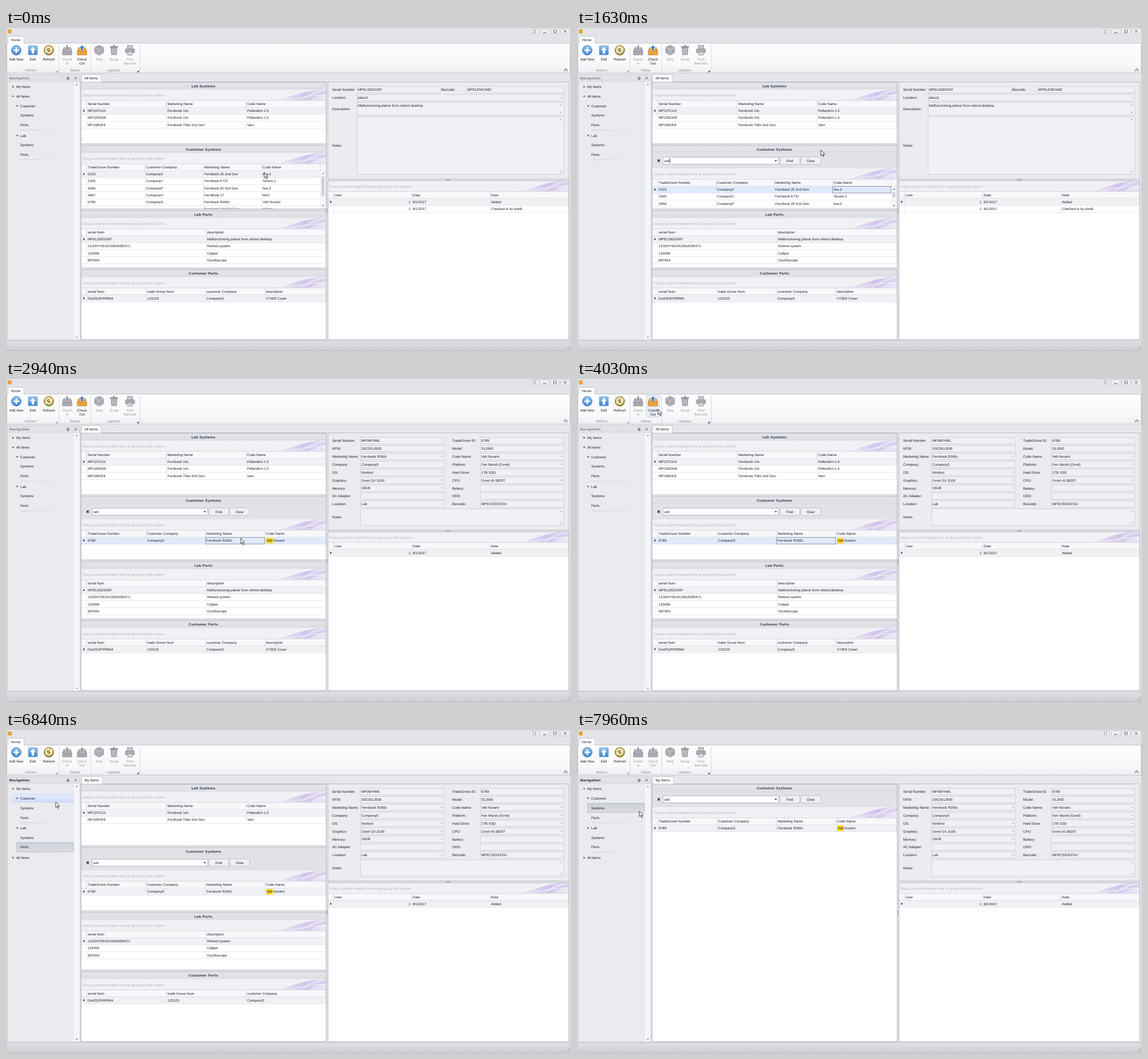
An HTML page for the animation above (8000 ms loop, 989 by 566 pixels).

```html
<!DOCTYPE html>
<html lang="en">
<head>
<meta charset="utf-8">
<title>Inventory</title>
<style>
html, body { margin: 0; width: 100%; height: 100%; overflow: hidden; background: #e6e7ec; }
#stage { display: block; width: 100vw; height: 100vh; }
text { font: 6.1px "Liberation Sans", Arial, sans-serif; fill: #1c1e28; text-rendering: geometricPrecision; white-space: pre; }
.bold { font: bold 5.9px "DejaVu Sans", sans-serif; fill: #464a55; }
.hint { font-size: 6.28px; fill: #b4b6be; }
.dim { fill: #85888f; }
.off { fill: #9a9ca3; }
.mid { text-anchor: middle; }
.end { text-anchor: end; }
</style>
</head>
<body>
<svg id="stage" viewBox="0 0 989 566">
  <defs>
    <linearGradient id="ribbon" x2="0" y2="1"><stop stop-color="#fdfdfe"/><stop offset=".7" stop-color="#f8f8fa"/><stop offset="1" stop-color="#eeeff2"/></linearGradient>
    <linearGradient id="status" x2="0" y2="1"><stop stop-color="#dfe0e5"/><stop offset="1" stop-color="#cdcfd5"/></linearGradient>
    <linearGradient id="caption" x2="0" y2="1"><stop stop-color="#e5e6eb"/><stop offset="1" stop-color="#dcdee4"/></linearGradient>
    <linearGradient id="hover" x2="0" y2="1"><stop stop-color="#e4ecfd"/><stop offset="1" stop-color="#cfdcfa"/></linearGradient>
    <linearGradient id="picked" x2="0" y2="1"><stop stop-color="#cdd0d7"/><stop offset="1" stop-color="#dadce2"/></linearGradient>
    <linearGradient id="blue" x2="0" y2="1"><stop stop-color="#8fc3f2"/><stop offset="1" stop-color="#3b83cc"/></linearGradient>
    <linearGradient id="gold" x2="0" y2="1"><stop stop-color="#cdb95a"/><stop offset="1" stop-color="#94812a"/></linearGradient>
    <linearGradient id="fade"><stop stop-color="#c3c5cc"/><stop offset="1" stop-color="#c3c5cc" stop-opacity="0"/></linearGradient>
    <linearGradient id="lilac"><stop stop-color="#d9cdf0" stop-opacity="0"/><stop offset=".6" stop-color="#cdbfea"/><stop offset="1" stop-color="#e4dcf4"/></linearGradient>
    <g id="swoosh">
      <path d="M0 19C35 13 62 2 100 0V19Z" fill="url(#lilac)" opacity=".45"/>
      <path d="M22 19C42 9 62 2 84 0H94C76 5 60 12 52 19Z" fill="url(#lilac)" opacity=".85"/>
      <path d="M58 19C72 10 86 4 100 2V7C88 10 77 14 71 19Z" fill="#cbbdea" opacity=".55"/>
      <path d="M10 18C40 10 60 4 82 0M34 19C56 13 78 9 100 10" fill="none" stroke="#fff" stroke-width=".9" opacity=".8"/>
    </g>
  </defs>
  <g id="view"></g>
  <path id="cursor" d="M0 0V9.6L2.2 7.6L3.9 11.4L5.4 10.7L3.8 7.1H6.8Z" fill="#fff" stroke="#15161c" stroke-width=".8"/>
</svg>
<script>
const LOOP = 8000;
const view = document.getElementById('view');
const cursor = document.getElementById('cursor');

// start, end, number of steps, way points
const moves = [
  [80, 630, 8, [452, 253], [449, 254], [446, 250], [432, 224]],
  [780, 780, 1, [432, 224], [427, 214]],
  [2100, 2480, 6, [427, 214], [424, 240], [411, 279]],
  [3250, 4030, 11, [411, 279], [270, 165], [150, 72], [112, 58], [142, 53]],
  [4100, 4410, 5, [142, 53], [190, 60], [223, 65], [200, 60], [160, 52], [128, 47]],
  [5190, 5650, 7, [128, 47], [118, 66], [92, 95]],
  [6430, 6840, 6, [92, 95], [90, 112], [87, 126]],
  [6910, 7150, 4, [87, 126], [84, 134]],
  [7790, 7960, 3, [84, 134], [109, 142]]
];

function pointer(t) {
  const m = moves.filter(m => m[0] <= t).pop();
  if (!m) return moves[0][3];
  const [a, b, n, ...pts] = m;
  const step = a === b ? 0 : Math.floor((t - a) / (b - a) * (n - 1) + 1e-6);
  const p = Math.min(1, (step + 1) / n) * (pts.length - 1);
  const i = Math.min(pts.length - 2, Math.floor(p));
  return [0, 1].map(k => pts[i][k] + (pts[i + 1][k] - pts[i][k]) * (p - i));
}

const txt = (x, y, s, cls = '') => `<text x="${x}" y="${y + 2.1}" class="${cls}">${s}</text>`;
const path = (d, fill, stroke = 'none', w = 1) => `<path d="${d}" fill="${fill}" stroke="${stroke}" stroke-width="${w}"/>`;
const rect = (x, y, w, h, fill, stroke, r = 0) => stroke
  ? `<rect x="${x + .5}" y="${y + .5}" width="${w - 1}" height="${h - 1}" rx="${r}" fill="${fill}" stroke="${stroke}" stroke-width=".8"/>`
  : `<rect x="${x}" y="${y}" width="${w}" height="${h}" rx="${r}" fill="${fill}"/>`;
const line = (x1, y1, x2, y2, c) => path(`M${x1} ${y1}L${x2} ${y2}`, 'none', c, .8);
const right = (x, y, c = '#22242c') => path(`M${x - 1} ${y - 2.2}L${x + 1.6} ${y}L${x - 1} ${y + 2.2}Z`, c);
const down = (x, y, c = '#4a4d57') => path(`M${x - 2} ${y - 1}H${x + 2}L${x} ${y + 1.4}Z`, c);
const up = (x, y, c = '#8b8e97') => path(`M${x - 2} ${y + 1}H${x + 2}L${x} ${y - 1.4}Z`, c);
const at = (x, y, s) => `<g transform="translate(${x} ${y})">${s}</g>`;
const clip = (x, y, w, h, s) => `<svg x="${x}" y="${y}" width="${w}" height="${h}" viewBox="${x} ${y} ${w} ${h}">${s}</svg>`;

function tray(body, edge, arrow, isIn) {
  return path('M-8 1L-6 -5H6L8 1V8H-8Z', body, edge, .7)
    + path('M-8 1H-3.5L-2 3.5H2L3.5 1H8V8H-8Z', body, edge, .7)
    + path(isIn ? 'M0 1L-4 -4H-1.8V-9H1.8V-4H4Z' : 'M0 -9L-4.6 -4H-1.9V1H1.9V-4H4.6Z', arrow, '#fff', .5);
}

function ribbon(s) {
  const grey = '#a9abb1', edge = '#8f9197';
  const buttons = [
    [18, 'Add New', '', 1, `<circle r="8.5" fill="url(#blue)" stroke="#2f6fb3" stroke-width=".7"/>` + path('M-5 0H5M0 -5V5', 'none', '#fff', 2.6)],
    [47, 'Edit', '', 1, rect(-8.5, -8.5, 17, 17, 'url(#blue)', '#7fa6cf', 1) + path('M0 -6L-5 0H-2V6H2V0H5Z', '#fff')],
    [75, 'Refresh', '', 1, `<circle r="8.6" fill="url(#gold)" stroke="#83742c" stroke-width=".7"/>` + path('M-4.5 2A4.7 4.7 0 0 1 3.2 -3.4M4.5 -1A4.7 4.7 0 0 1 -3 3.6', 'none', '#fff', 2) + path('M5.8 -5V.2L1 -1ZM-5.8 5V0L-1 1.2Z', '#fff')],
    [107, 'Check', 'In', 0, tray(grey, edge, '#97999f', true)],
    [133, 'Check', 'Out', !s.out, s.out ? tray(grey, edge, '#97999f') : tray('#f0a63c', '#b9772a', '#3f7fc4')],
    [163, 'Ship', '', 0, path('M0 -9L8 -5V4L0 9L-8 4V-5Z', grey, edge, .6) + path('M-8 -5L0 -1L8 -5M0 -1V9', 'none', '#d2d3d7', .9)],
    [189, 'Scrap', '', 0, path('M-5.5 -5H5.5L4.5 8H-4.5Z', grey, edge, .6) + path('M-7 -6H7M-2 -8.3H2', 'none', edge, 1.8) + path('M-2.5 -3V6M0 -3V6M2.5 -3V6', 'none', '#d8d9dc', .8)],
    [217, 'Print', 'Barcode', 0, rect(-5, -9, 10, 8, '#c3c5ca', edge) + rect(-8.5, -3, 17, 8, grey, edge, 1) + rect(-4.5, 2, 9, 7, '#d4d5d9', edge)]
  ];
  let o = rect(0, 0, 989, 27, '#e3e4e9') + rect(1, 26, 987, 53.5, 'url(#ribbon)', '#b9bbc3')
    + rect(3, 14, 29, 14, '#fcfcfd') + path('M3.5 27V15.5Q3.5 14.5 4.5 14.5H30.5Q31.5 14.5 31.5 15.5V27', 'none', '#b9bbc3', .8)
    + txt(17, 21, 'Home', 'mid') + rect(3, 2.5, 7, 7, '#e3a443');
  if (s.hot) o += rect(121, 28, 24.5, 39, '#e9effb', '#c0cbe4', 1);
  for (const [x, a, b, on, icon] of buttons) {
    const cls = on ? 'mid' : 'mid off';
    o += at(x, 39, icon) + txt(x, 54.5, a, cls) + txt(x, 62, b, cls);
  }
  for (const [x, name] of [[43, 'Actions'], [120.5, 'Status'], [188, 'Logistics']]) o += txt(x, 74, name, 'mid dim');
  for (const x of [93, 148.5, 235]) o += line(x, 29, x, 78, '#d0d2d8');
  for (const x of [89, 231]) o += path(`M${x + 1.5} 74V77.5H${x - 2}Z`, x < 100 ? '#8b8e97' : '#33353d');
  o += path('M976.5 74L979.7 71L983 74M976.5 76L979.7 73L983 76', 'none', '#5a5d66', .9);
  for (const x of [917, 935, 953, 971]) o += rect(x, 1, 16, 10, '#eeeff3', '#c6c8cf', 1);
  return o + path('M922 4H924M926 4H928M922 8H924M926 8H928M924.5 6H925.8M940 8H946M976.5 3.8L981 8.2M981 3.8L976.5 8.2', 'none', '#50535c', 1)
    + rect(958, 3.5, 6, 5, 'none', '#50535c');
}

function navItems(mine) {
  const kids = y => [
    ['Customer', y, 1, true], ['Systems', y + 16.8, 2], ['Parts', y + 33.6, 2],
    ['Lab', y + 52, 1, true], ['Systems', y + 68.8, 2], ['Parts', y + 85.3, 2]
  ];
  return mine
    ? [['My Items', 103, 0, true], ...kids(119.8), ['All Items', 223.8, 0, false]]
    : [['My Items', 103, 0, false], ['All Items', 119.8, 0, true], ...kids(136.5)];
}

function nav(s) {
  let o = rect(2, 82, 128, 465, '#eaebef', '#c3c5cc') + rect(3, 83, 126, 11.5, 'url(#caption)')
    + rect(119, 95, 10, 451, '#f5f5f8') + up(124, 99) + down(124, 542, '#8b8e97')
    + `<text x="5.5" y="90.4" class="bold" style="fill:${s.nav ? '#30333c' : '#898c95'}">Navigation</text>`
    + path('M107.2 86H110.2V89H107.2ZM106.4 89H111M108.7 89V91.5M119.8 86L123.8 90M123.8 86L119.8 90', 'none', '#5a5d66', .9);
  navItems(s.mine).forEach(([name, y, level, open], i) => {
    const left = [3, 11, 18][level], x = [18, 25, 25][level];
    if (i === s.sel) o += rect(left, y - 8.5, 100.5 + 18 - left, 17, 'url(#picked)', '#b6b9c2');
    else if (i === s.over) o += rect(left, y - 8, 118.5 - left, 15.5, 'url(#hover)', '#cbd6ef');
    if (level < 2) o += open ? down(x - 5.5, y) : right(x - 5.5, y, '#4a4d57');
    o += txt(x, y, name);
    if (name === 'Parts') o += rect(25, y + 8.7, 85, .8, 'url(#fade)');
  });
  return o;
}

function grid(x, w, y, bottom, cols, heads, rows, opt = {}) {
  const end = x + w, stop = opt.bar ? 550 : end, h0 = y + 19, r0 = y + 31.2, pitch = 12.2;
  let o = rect(x, y, w, bottom - y, '#fff') + rect(x, y, w, 19, '#f0f1f4')
    + `<use href="#swoosh" x="${end - 100}" y="${y}"/>` + txt(x + 2.5, y + 10, 'Drag a column header here to group by that column', 'hint')
    + rect(x, h0, w, 12, '#f8f8fa') + line(x, h0, end, h0, '#cfd1d8') + line(x, r0, end, r0, '#cfd1d8');
  rows.forEach((row, i) => {
    const top = r0 + i * pitch, mid = top + 5.8;
    if (!i) o += rect(x, top + .4, stop - x, pitch - .4, opt.blue ? '#e1eafc' : '#f0f1f4') + right(x + 4.5, mid);
    o += line(x, top + pitch, stop, top + pitch, '#e0e2e7');
    row.forEach((cell, c) => {
      if (opt.numeric && !c) o += txt(cols[1] - 2, mid, cell, 'end');
      else if (opt.mark && c === 3) {
        const [a, b] = cell.split(' ');
        o += rect(cols[c] + 2.5, top + 1.2, 11.5, 9.8, '#ffd51c') + txt(cols[c] + 3, mid, a) + txt(cols[c] + 15, mid, b);
      } else o += txt(cols[c] + 2, mid, cell);
    });
  });
  cols.concat(stop).forEach((c, i) => {
    o += line(c, h0, c, r0, '#cfd1d8');
    o += line(c, r0, c, r0 + rows.length * pitch, '#e0e2e7');
    if (i < heads.length) o += txt(c + 2, h0 + 6, heads[i]);
  });
  if (opt.focus >= 0) {
    const a = cols[opt.focus], b = cols[opt.focus + 1] || stop;
    o += rect(a, r0, b - a, 12.4, 'none', '#7d8798');
  }
  if (opt.bar) {
    o += rect(550, r0, end - 550, bottom - r0, '#f4f4f7') + up(555, r0 + 5, '#777a83') + down(555, bottom - 5.5, '#777a83')
      + rect(552.5, r0 + 10.5, 4.5, opt.bar, '#d3d5db', '#b5b8c0', 1);
  }
  return clip(x, y, w, bottom - y, o);
}

function panel(title, top, bottom, cols, heads, rows, opt = {}) {
  let o = rect(132, top, 428, 13.2, 'url(#caption)') + txt(345.5, top + 6.4, title, 'bold mid');
  if (opt.find) {
    const y = top + 26.5;
    o += rect(132, top + 13, 428, 27.2, '#e0e2e7') + path(`M141 ${y - 2}L145 ${y + 2}M145 ${y - 2}L141 ${y + 2}`, 'none', '#22242c', 1.4)
      + rect(150, y - 6.5, 203.5, 13, '#fff', '#a9acb5') + down(348, y, '#22242c');
    for (const [x, s] of [[355, 'Find'], [391.5, 'Clear']]) o += rect(x, y - 7, 35.5, 14, '#eff0f3', '#b3b6be', 1) + txt(x + 17.5, y, s, 'mid');
    o += opt.query === null ? txt(153, y, 'Enter text to search...', 'off') : txt(152.5, y, opt.query);
    if (opt.caret) {
      const x = 153 + [0, 3, 6.2, 7.7, 9.6][(opt.query || '').length];
      o += line(x, y - 4, x, y + 4, '#111');
    }
  }
  return o + grid(132, 428, top + 13 + (opt.find ? 27 : 0), bottom, cols, heads, rows, opt)
    + line(132, top, 560, top, '#a9acb5') + line(132, bottom, 560, bottom, '#a9acb5');
}

const thirds = [141, 280.5, 420], quarters = [141, 245, 349, 453];
const labSystems = [
  ['MP137CLN', 'Fernbook 14c', 'Pellandrin-1.5'],
  ['MP126GNK', 'Fernbook 14c', 'Pellandrin-1.5'],
  ['MP108VE8', 'Fernbook Tilde 2nd Gen', 'Varn']
];
const clientSystems = [
  ['0123', 'CompanyX', 'Fernbook 20 2nd Gen', 'Ilva-2'],
  ['2345', 'CompanyY', 'Fernbook K737', 'Tarven-1'],
  ['3456', 'CompanyP', 'Fernbook 20 2nd Gen', 'Ilva-2'],
  ['4567', 'CompanyV', 'FernBook 17', 'Morl'],
  ['6789', 'CompanyS', 'Fernbook R260c', 'Velt Norami'],
  ['', '', 'Fernbook 14c 3rd Gen', 'Halvex']
];
const labParts = [
  ['MPELS6ZG097', 'Malfunctioning planar from retired desktop'],
  ['1S10HY0014USMJ03RA7L', 'Retired system'],
  ['123456', 'Caliper'],
  ['987654', 'Oscilloscope']
];

function content(s) {
  const tab = s.own ? 37.5 : 35.5;
  let o = rect(131, 94, 430, 452.5, '#e6e7ec', '#a3a6af')
    + rect(132, 81, tab, 14, '#fbfbfc') + path(`M132.5 95V81.5H${131.5 + tab}V95`, 'none', '#b3b6be', .8)
    + txt(137.5, 88, s.own ? 'My Items' : 'All Items');
  const clients = (top, bottom) => panel('Customer Systems', top, bottom,
    s.filtered ? quarters : [141, 243, 345, 447],
    ['TradeGrove Number', 'Customer Company', 'Marketing Name', 'Code Name'],
    s.filtered ? [clientSystems[4]] : clientSystems,
    { find: s.find, query: s.query, caret: s.caret, blue: s.blue, focus: s.focus, mark: s.filtered, bar: s.filtered ? 0 : s.find ? 9 : 33 });
  if (s.only) return o + clients(95, 546);
  const parts = [['Ds425JPrRRMA', '123123', 'CompanyS', 'V730S Cover'].slice(0, s.own ? 3 : 4)];
  const partHeads = ['serial Num', 'trade Grove Num', 'customer Company', 'description'].slice(0, s.own ? 3 : 4);
  return o
    + panel('Lab Systems', 95, 203, thirds, ['Serial Number', 'Marketing Name', 'Code Name'], s.own ? [labSystems[0], labSystems[2]] : labSystems)
    + clients(206, 317)
    + panel('Lab Parts', 320, 420.5, [141, 350], ['serial Num', 'description'], s.own ? labParts.slice(1) : labParts)
    + panel('Customer Parts', 423.5, 546, s.own ? thirds : quarters, partHeads, parts);
}

function field(x, y, w, h, value = '', combo) {
  let o = rect(x, y, w, h, '#f0f1f4', '#c9cbd2') + txt(x + 2, y + 5.9, value);
  if (combo === 1) o += down(x + w - 5, y + h / 2, '#b4b6be');
  if (combo === 2) o += up(x + w - 6, y + 5, '#b4b6be') + down(x + w - 6, y + h - 5, '#b4b6be');
  return o;
}

function details(s) {
  let o = rect(563, 94, 422.5, 171, '#ebecf0', '#b0b3bb');
  if (s.detail) {
    const left = [['Serial Number:', 'MP06FHWL'], ['MTM:', '20C0S1J500'], ['Marketing Name:', 'Fernbook R260c', 1], ['Company:', 'CompanyS'],
      ['OS:', 'Nimbrel', 1], ['Graphics:', 'Ovrel GX 3100', 1], ['Memory:', '16GB', 1], ['AC Adapter:', ''], ['Location:', 'Lab', 1]];
    const side = [['TradeGrove ID:', '6789'], ['Model:', 'S1J500'], ['Code Name:', 'Velt Norami', 1], ['Platform:', 'Fen Marsh (Ovrel)', 1],
      ['Hard Drive:', '1TB SSD', 1], ['CPU:', 'Ovrel v5-3820T', 1], ['Battery:', ''], ['ODD:', ''], ['Barcode:', 'MPECSE01FDU']];
    const column = (list, x, bx, w) => list.forEach(([name, value, combo], i) => {
      const y = 108 + i * 13.9;
      o += txt(x, y, name) + field(bx, y - 6, w, 12, value, combo);
    });
    column(left, 571, 620, 148);
    column(side, 781, 830, 147);
    o += txt(571, 242, 'Notes:') + field(620, 227, 357, 30, '', 2);
  } else {
    o += txt(571, 108, 'Serial Number:') + field(614, 102, 146.5, 12, 'MPELS6ZG097')
      + txt(762, 108, 'Barcode:') + field(805.5, 102, 171.5, 12, 'MPELEMCI48Z')
      + txt(571, 122, 'Location:') + field(614, 116, 363, 12, 'place1', 1)
      + txt(571, 142, 'Description:') + field(614, 130, 363, 23, 'Malfunctioning planar from retired desktop', 2)
      + txt(571, 206, 'Notes:') + field(614, 155, 363, 102, '', 2);
  }
  const log = [['1', '8/1/2017', 'Added'], ['1', '8/1/2017', 'Checked in by dvelk']];
  return o + rect(770, 265.3, 8, 1.6, '#a9acb5') + rect(560.8, 316, 1.6, 8, '#b6b9c1')
    + grid(564, 421, 267.5, 546, [573, 710, 847], ['User', 'Date', 'Note'], s.log ? log.slice(0, 1) : log, { numeric: true })
    + rect(563, 267, 422.5, 279.5, 'none', '#a3a6af');
}

function state(t, [x, y]) {
  const mine = t >= 5800, typed = [1250, 1330, 1400, 1630].filter(k => t >= k).length;
  return {
    find: t >= 780,
    query: t < 1180 ? null : 'velt'.slice(0, typed),
    caret: t >= 780 && t < 2480,
    filtered: t >= 1800,
    blue: t >= 230 && t < 5730,
    focus: t < 230 || t >= 5730 ? -1 : t < 2480 ? 3 : 2,
    detail: t >= 2630,
    log: t >= 2780,
    out: t >= 4730,
    hot: t < 4730 && x >= 121 && x < 146 && y >= 28 && y < 67,
    nav: t >= 5730,
    mine,
    own: t >= 5880,
    only: t >= 7400,
    sel: !mine ? -1 : t < 7320 ? 6 : 2,
    over: x < 119 ? navItems(mine).findIndex(n => Math.abs(y - n[1]) <= 8.4) : -1
  };
}

function render(s) {
  return rect(0, 0, 989, 566, '#e6e7ec') + ribbon(s) + nav(s) + content(s) + details(s)
    + rect(0, 548, 989, 18, 'url(#status)') + line(0, 548, 989, 548, '#b9bbc3') + line(0, 565.5, 989, 565.5, '#b0b3bb')
    + path('M981 563L987 557M984 563L987 560', 'none', '#9a9da6', .9)
    + path('M.5 0V566M988.5 0V566', 'none', '#c0c2c9', .8);
}

let last = '';
function draw(t) {
  const pos = pointer(t), s = state(t, pos), key = JSON.stringify(s);
  if (key !== last) view.innerHTML = render(s);
  last = key;
  cursor.setAttribute('transform', `translate(${pos})`);
}

function tick() {
  draw(performance.now() % LOOP);
  requestAnimationFrame(tick);
}
tick();
</script>
</body>
</html>
```
